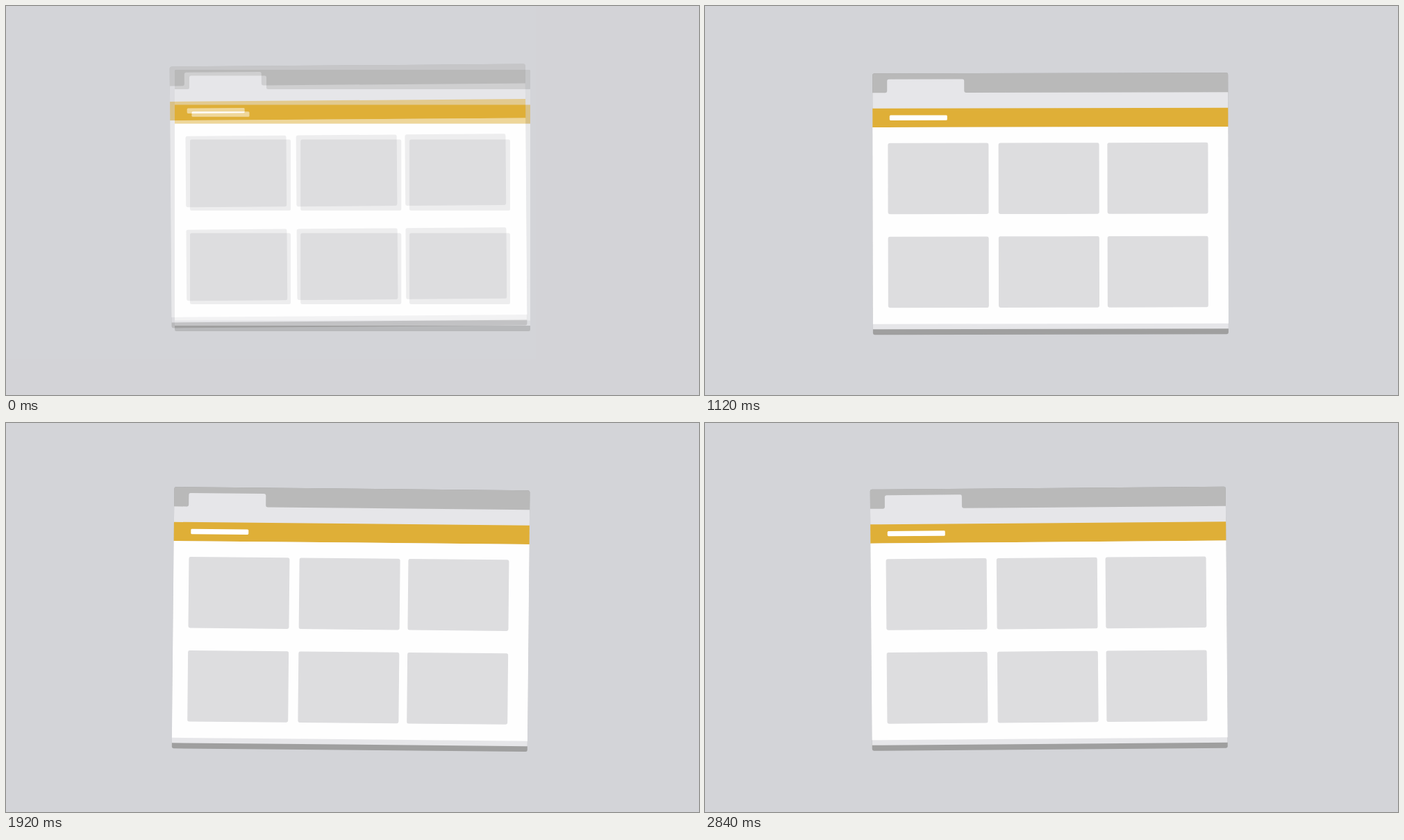
Animation of 998x561 px, one loop 2.88 s. Source, as an HTML page:

```html
<!DOCTYPE html>
<html lang="en">
<head>
<meta charset="utf-8">
<title>Shaking window</title>
<style>
  html, body { margin: 0; width: 100%; height: 100%; overflow: hidden; background: #d3d4d8; }
  svg { display: block; width: 100vw; height: 100vh; }
</style>
</head>
<body>
<svg viewBox="0 0 998 561">
  <defs>
    <rect id="tile" width="145" height="102.6" rx="2.5" fill="#dddddf"/>
    <g id="row">
      <use href="#tile" x="265"/>
      <use href="#tile" x="424.2"/>
      <use href="#tile" x="581"/>
    </g>
    <g id="window">
      <rect x="243" y="92" width="512" height="377" rx="2.5" fill="#9f9f9f"/>
      <path d="M243 121V94.5q0-2.5 2.5-2.5H752.5q2.5 0 2.5 2.5V121z" fill="#b9b9b9"/>
      <path d="M243 120H261.5q2.5 0 2.5-2.5V103q0-2.5 2.5-2.5H372.5q2.5 0 2.5 2.5V117.5q0 2.5 2.5 2.5H755V461H243z" fill="#e6e6e9"/>
      <rect x="243" y="142.5" width="512" height="27.3" fill="#dfaf37"/>
      <rect x="267.5" y="152.3" width="83" height="7.4" rx="1.5" fill="#fff"/>
      <rect x="243" y="169.8" width="512" height="283.7" fill="#fefefe"/>
      <use href="#row" y="192.5"/>
      <use href="#row" y="327.4"/>
    </g>
  </defs>
  <use id="shaking" href="#window"/>
  <g id="still" opacity=".5">
    <rect width="998" height="561" fill="#d3d4d8"/>
    <use href="#window"/>
  </g>
</svg>
<script>
  const LOOP = 2880, STEP = 40;

  // Poses the window settles into between swings
  const poses = [
    { at: 0, x: -5.9, y: -6.5, angle: -.43 },
    { at: 400, x: 3.5, y: -2.7, angle: -.53 },
    { at: 800, x: -1.2, y: -.7, angle: .3 },
    { at: 1440, x: -1.7, y: -1.7, angle: -.53 },
    { at: 1920, x: -2.4, y: 2.7, angle: .55 },
    { at: 2280, x: -1.2, y: -5.9, angle: .14 },
    { at: 2840, x: -3.75, y: 1.8, angle: -.46 }
  ];

  // Ease from pose to pose, swinging sideways and dipping on the way
  function poseAt(time) {
    const index = Math.max(1, poses.findIndex(pose => pose.at >= time));
    const from = poses[index - 1], to = poses[index];
    const u = (time - from.at) / (to.at - from.at);
    const arc = Math.sin(Math.PI * u);
    const blend = key => from[key] + (to[key] - from[key]) * (1 - Math.cos(Math.PI * u)) / 2;
    return {
      x: blend("x") + 6.5 * arc * Math.sin(2 * Math.PI * u),
      y: blend("y") + 6 * arc * arc,
      angle: blend("angle")
    };
  }

  const shaking = document.getElementById("shaking");
  const still = document.getElementById("still");
  const start = performance.now();

  function draw() {
    const time = Math.floor((performance.now() - start) % LOOP / STEP) * STEP;
    const { x, y, angle } = poseAt(time);
    shaking.setAttribute("transform", `translate(${x} ${y}) rotate(${angle} 499 280.5)`);
    still.style.display = time < STEP ? "" : "none";
    requestAnimationFrame(draw);
  }

  draw();
</script>
</body>
</html>
```
